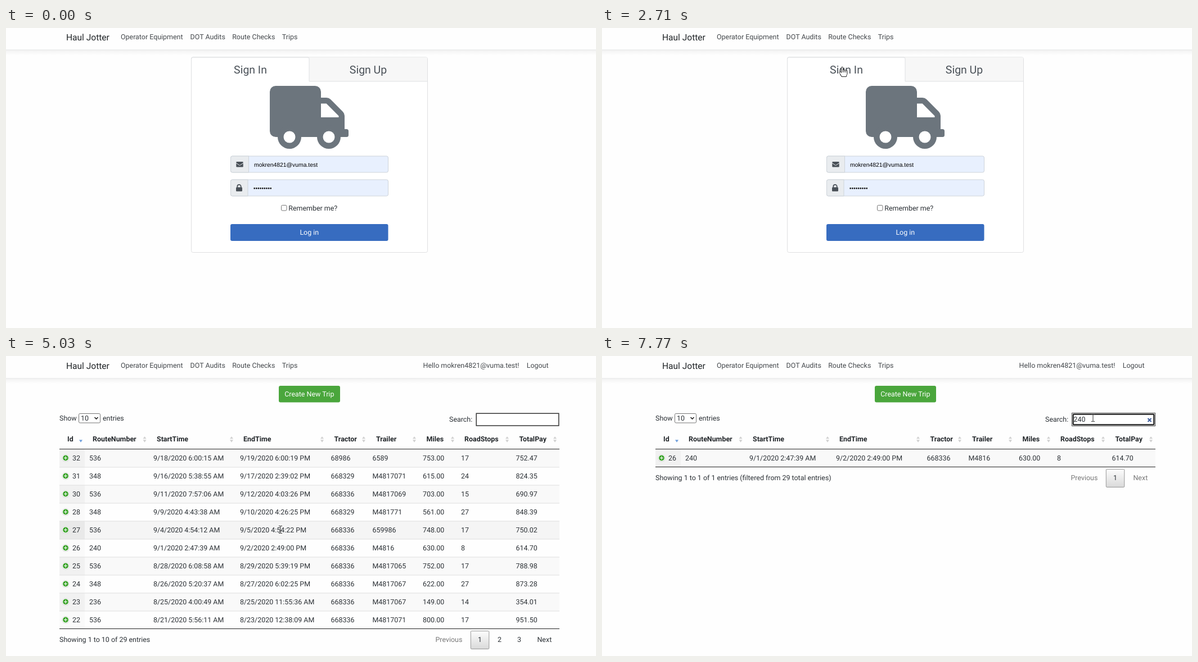
These frames come from a looping animation (1049x534 px, 8 s). An HTML page:

```html
<!DOCTYPE html>
<html lang="en">
<head>
<meta charset="utf-8">
<title>Trip log</title>
<style>
html, body { margin: 0; width: 100%; height: 100%; overflow: hidden; background: #fefefe; }
svg { display: block; font: 12.44px Roboto, sans-serif; fill: #2b3035; text-rendering: geometricPrecision; }
text { white-space: pre; }
.brand { font-size: 15.55px; fill: #1f2326; }
.nav { fill: #44484c; }
.tab { font-size: 19.44px; fill: #495057; text-anchor: middle; }
.mid { text-anchor: middle; }
.end { text-anchor: end; }
.inv { fill: #fff; text-anchor: middle; }
.head { font-weight: 700; fill: #212529; }
.dim { fill: #777; }
.title { font-size: 18.66px; }
.preview { font: 10.37px "Liberation Sans", Arial, sans-serif; fill: #000; }
.typed { fill: #212529; }
.icon { fill: #495057; }
.line { fill: none; stroke: #dee0e2; }
.dots { fill: none; stroke: #111; stroke-linecap: round; }
.cursor path { fill: #fff; stroke: #222; stroke-linejoin: round; }
.cursor .beam { fill: none; stroke: #333; }
</style>
</head>
<body>
<svg id="stage" width="1049" height="534" viewBox="0 0 1049 534"></svg>
<script>
const LOOP = 8000;
const MAIL = 'mokren4821@vuma.test';
const BLUE = '#376cc0';

const text = (x, y, s, cls = '') => `<text x="${x}" y="${y}" class="${cls}">${s}</text>`;
const box = (x, y, w, h, fill, more = '') =>
  `<rect x="${x}" y="${y}" width="${w}" height="${h}" fill="${fill}" ${more}/>`;
const path = (d, more = '') => `<path d="${d}" ${more}/>`;
const during = (spans, body) => `<g data-on="${spans}">${body}</g>`;
const rounded = 'rx="3"';
const field = 'rx="3" stroke="#ced4da"';

function nav(dy) {
  const links = [[204, 'Operator Equipment'], [327.6, 'DOT Audits'], [402.2, 'Route Checks'], [490.8, 'Trips']];
  return box(0, 38.5 + dy, 1049, 1, '#e4e5e6') +
    box(0, 39.5 + dy, 1049, 9, 'url(#shade)') +
    text(107, 22 + dy, 'Haul Jotter', 'brand') +
    links.map(([x, s]) => text(x, 20.4 + dy, s, 'nav')).join('');
}

function bullets(x, y, pitch, size) {
  return path(`M${x} ${y}h${pitch * 8 + .1}`, `class="dots" stroke-width="${size}" stroke-dasharray="0 ${pitch}"`);
}

// Autofilled values: small while previewed, full size once accepted.
function filled(x, mailY, passX, passY, preview, typed) {
  return during(preview, text(x, mailY, MAIL, 'preview') + bullets(passX, passY + 1, 3.63, 2.7)) +
    during(typed, text(x, mailY, MAIL, 'typed') + bullets(passX, passY, 4.2, 2.9));
}

function tabs(active) {
  const x = active ? 329.5 : 539.5;
  const edge = active ? 'M329.5 95V55a3 3 0 0 1 3-3H536a3 3 0 0 1 3 3V95H749.5M539 95'
                      : 'M329.5 95H539V55a3 3 0 0 1 3-3H746.5a3 3 0 0 1 3 3V95';
  return box(active ? 539 : 330, 52.5, 210, 42.5, '#f7f7f7') + path(edge, 'class="line"') +
    text(434.5, 80.6, 'Sign In', 'tab') + text(644, 80.6, 'Sign Up', 'tab');
}

const card = bottom => box(329.5, 52, 420, bottom - 52, '#fff', 'rx="3" stroke="#dfe0e1"');

function truck() {
  const wheel = x => `<circle cx="${x}" cy="416" r="96"/><circle cx="${x}" cy="416" r="48" fill="#fff"/>`;
  return `<g transform="translate(469 103) scale(.21875)" fill="#6c757d">` +
    path('M48 0H368a48 48 0 0 1 48 48V96h44a48 48 0 0 1 34 14l100 100a48 48 0 0 1 14 34V352h16' +
      'a16 16 0 0 1 16 16v32a16 16 0 0 1-16 16H48a48 48 0 0 1-48-48V48a48 48 0 0 1 48-48z' +
      'M416 144V256H560V244L460 144z', 'fill-rule="evenodd"') + wheel(160) + wheel(480) + '</g>';
}

function signIn() {
  const group = (y, split) => box(399.5, y, 280, 29, '#e8f0fe', field) +
    path(`M${split} ${y}H402.5a3 3 0 0 0-3 3v23a3 3 0 0 0 3 3H${split}z`, 'fill="#e9ecef" stroke="#ced4da"');
  const envelope = box(409.3, 238, 12.4, 9.4, '#495057', 'rx="1.2"') +
    path('M409 240.2l5.4 3.8q1.1.7 2.2 0l5.4-3.8', 'fill="none" stroke="#e9ecef"');
  const lock = box(409, 283.6, 11, 7.2, '#495057', 'rx="1.2"') +
    path('M411.3 284v-2a3.2 3.2 0 0 1 6.4 0v2', 'fill="none" stroke="#495057" stroke-width="1.7"');
  return card(399.5) + tabs(true) +
    during('1240-1620', path('M539 95V55a3 3 0 0 1 3-3H749', 'fill="none" stroke="#d3d6d9"')) +
    truck() + group(228, 431.5) + group(270, 430) + envelope + lock +
    filled(441, 247, 441.7, 284.4, '0-540 2710-2940', '540-1620 2940-4100') +
    box(489.5, 315.5, 9.5, 9.5, '#fff', 'rx="2" stroke="#767676"') +
    text(502.3, 325, 'Remember me?') +
    box(399, 349, 280.5, 30, BLUE, rounded) +
    during('3640-4100', box(398, 348, 282.5, 32, '#2e67db', 'rx="4" stroke="#a3c2f5" stroke-width="2.4"')) +
    text(539.3, 368.2, 'Log in', 'inv');
}

function signUp() {
  const input = y => box(357.7, y, 363, 29.5, '#e8f0fe', field);
  return card(361.5) + tabs(false) +
    text(357.5, 128.5, 'Create a new account.', 'title') +
    path('M357.5 152.5h363', 'class="line"') +
    text(357.5, 196, 'Email') + input(207) +
    text(357.5, 263, 'Password') + input(274) +
    filled(367, 226, 368.4, 289, '1620-2320', '2320-2710') +
    box(357.5, 316.4, 67, 29.6, BLUE, rounded) + text(391, 335.6, 'Register', 'inv');
}

const trips = `32|536|9/18 6:00:15 AM|9/19 6:00:19 PM|68986|6589|753.00|17|752.47
31|348|9/16 5:38:55 AM|9/17 2:39:02 PM|668329|M4817071|615.00|24|824.35
30|536|9/11 7:57:06 AM|9/12 4:03:26 PM|668336|M4817069|703.00|15|690.97
28|348|9/9 4:43:38 AM|9/10 4:26:25 PM|668329|M481771|561.00|27|848.39
27|536|9/4 4:54:12 AM|9/5 4:54:22 PM|668336|659986|748.00|17|750.02
26|240|9/1 2:47:39 AM|9/2 2:49:00 PM|668336|M4816|630.00|8|614.70
25|536|8/28 6:08:58 AM|8/29 5:39:19 PM|668336|M4817065|752.00|17|788.98
24|348|8/26 5:20:37 AM|8/27 6:02:25 PM|668336|M4817067|622.00|27|873.28
23|236|8/25 4:00:49 AM|8/25 11:55:36 AM|668336|M4817067|149.00|14|354.01
22|536|8/21 5:56:11 AM|8/23 12:38:09 AM|668336|M4817071|800.00|17|951.50
19|348|8/12 5:24:16 AM|8/13 3:12:40 PM|668336|M4817067|618.00|27|861.15
15|536|7/31 6:02:24 AM|8/1 5:40:08 PM|668329|M4817065|751.00|17|786.30
11|348|7/22 4:51:37 AM|7/23 2:36:24 PM|668336|M4817071|615.00|26|842.90`
  .split('\n').map(row => row.replace(/(\/\d+) /g, '$1/2020 ').split('|'));

const cols = [118, 148, 262, 416, 577.5, 651.5, 741, 809, 906.5];
const heads = [[109, 'Id', 133], [154, 'RouteNumber', 246.5], [268, 'StartTime', 401], [422, 'EndTime', 562],
  [583.5, 'Tractor', 636], [658, 'Trailer', 726], [747.5, 'Miles', 794], [815, 'RoadStops', 891], [912.5, 'TotalPay', 976]];

function tableRow(cells, i) {
  const y = 166 + 32 * i, odd = i % 2 === 0;
  return box(95, y, 889, 32, odd ? '#f9f9f9' : '#fefefe') +
    box(95, y, 45, 32, odd ? '#f1f1f1' : '#fafafa') +
    `<g data-row="${i}">${box(95, y, 889, 32, '#f5f5f5')}${box(95, y, 45, 32, '#e9e9e9')}</g>` +
    (i ? box(95, y - .5, 889, 1, '#dfdfdf') : '') +
    `<circle cx="106" cy="${y + 15.7}" r="6.6" fill="#bbb"/>` +
    `<circle cx="106" cy="${y + 15.5}" r="5.6" fill="#3ca32c" stroke="#fff" stroke-width="1.3"/>` +
    path(`M103 ${y + 15.5}h6m-3-3v6`, 'stroke="#fff" stroke-width="1.2"') +
    cells.map((s, c) => text(cols[c], y + 19.6, s)).join('');
}

function table(rows, info, pages) {
  const end = 166 + 32 * rows.length, base = end + 22.7;
  const first = 912.5 - 35 * (pages - 1);
  let nums = '';
  for (let p = 0; p < pages; p++) nums += text(first + 35 * p, base, p + 1, 'mid');
  return rows.map(tableRow).join('') + box(95, end - 1, 889, 1, '#222') + text(95, base, info) +
    text(first - 79, base, 'Previous', 'dim') +
    box(first - 16.2, end + 3.5, 32.5, 32, 'url(#page)', 'rx="1.5" stroke="#979797"') + nums +
    text(944.5, base, 'Next', pages > 1 ? '' : 'dim');
}

function tripPage() {
  const up = (x, y) => path(`M${x - 3} ${y}h6l-3-4z`, 'fill="#d0d0d0"');
  const down = (x, y, c) => path(`M${x - 3} ${y}h6l-3 4.5z`, `fill="${c}"`);
  const header = heads.map(([x, s, sx], i) => text(x, 152.3, s, 'head') +
    (i ? up(sx, 147.3) + down(sx, 149.3, '#d0d0d0') : down(sx, 149.3, '#6f9fdc'))).join('');
  const caret = (span, x) => during(span, box(x, 105.5, 1, 15, '#111'));
  const found = rows => `Showing 1 to ${rows.length} of ${rows.length} entries (filtered from 29 total entries)`;
  const match = q => trips.filter(row => row.some(s => s.includes(q)));
  return nav(.9) + text(912.5, 21, `Hello ${MAIL}!`, 'nav end') + text(925.7, 21, 'Logout', 'nav') +
    box(485, 53, 109, 29.5, '#4aa63c', rounded) + text(539.3, 72.2, 'Create New Trip', 'inv') +
    text(95, 115, 'Show') + box(129.5, 102.5, 38, 16.5, '#fff', 'rx="2" stroke="#767676"') +
    text(133, 115.2, '10') + path('M157.5 109l3 3 3-3', 'fill="none" stroke="#222" stroke-width="1.6"') +
    text(172, 115, 'entries') + text(788, 117, 'Search:') +
    during('4100-5820', box(836.2, 102.2, 146.6, 21.8, '#fff', 'stroke="#333" stroke-width="1.5"')) +
    during('5820-8000', box(835.5, 101.5, 148, 23, '#fff', 'stroke="#444"') +
      box(837.7, 103.7, 143.6, 18.6, '#fff', 'rx="1" stroke="#111" stroke-width="2"')) +
    during('6670-6900', text(838.6, 117, '2')) + during('6900-7220', text(838.6, 117, '24')) +
    during('7220-8000', text(838.6, 117, '240')) +
    during('6670-8000', path('M970.5 111l6 6m0-6l-6 6', 'stroke="#43619f" stroke-width="2.2"')) +
    caret('5820-6200', 838.5) + caret('6670-6900', 845.5) + caret('6900-7220', 852.5) + caret('7220-7770', 859.7) +
    header +
    during('4100-6900', table(trips.slice(0, 10), 'Showing 1 to 10 of 29 entries', 3)) +
    during('6900-7220', table(match('24'), found(match('24')), 1)) +
    during('7220-8000', table(match('240'), found(match('240')), 1)) +
    box(95, 165.2, 889, 1, '#222');
}

const cursors = {
  arrow: path('M.5.5V16l3.7-3.5 2.6 5.7 2.5-1.1-2.5-5.5h5z'),
  hand: path('M-1.4 10V1.7a1.4 1.4 0 0 1 2.8 0V6.5a1.3 1.3 0 0 1 2.6.3a1.3 1.3 0 0 1 2.6.4a1.2 1.2 0 0 1 2.4.6V12' +
    'c0 2-1.6 3-1.6 5.6H-1.2C-1.5 15-4.8 12-5 10c0-1.6 1.8-1.8 3.6.6z') + path('M1.4 6.5V10M4 7V10M6.6 7.5V10'),
  beam: path('M-3-6.5h2.3L0-6l.7-.5H3M0-6V6M-3 6.5h2.3L0 6l.7.5H3', 'class="beam"')
};

const fade = (id, a, b) => `<linearGradient id="${id}" x2="0" y2="1">` +
  `<stop ${a}/><stop offset="1" ${b}/></linearGradient>`;

const stage = document.getElementById('stage');
stage.innerHTML = '<defs>' +
  fade('shade', 'stop-opacity=".045"', 'stop-opacity="0"') +
  fade('page', 'stop-color="#fdfdfd"', 'stop-color="#d9d9d9"') + '</defs>' +
  during('0-4100', nav(0)) + during('0-1620 2710-4100', signIn()) + during('1620-2710', signUp()) +
  during('4100-8000', tripPage()) +
  '<g class="cursor">' + Object.keys(cursors).map(k => `<g id="${k}">${cursors[k]}</g>`).join('') + '</g>';

// Pointer moves: first step, last step, number of steps, x, y.
const moves = [
  [210, 210, 1, 1007, 517], [290, 290, 1, 706, 213], [540, 1310, 11, 641, 73], [1390, 1390, 1, 646, 83],
  [1940, 2170, 4, 469, 78], [2320, 2320, 1, 448, 68], [2400, 2400, 1, 434, 60], [2480, 2480, 1, 427, 69],
  [2940, 3640, 10, 543, 361], [4410, 4410, 1, 543, 366], [4730, 5030, 5, 488, 309],
  [5110, 5490, 6, 862, 133], [5570, 5820, 4, 873, 110]
];

function pointer(t) {
  let x = 1060, y = 545;
  for (const [from, to, n, nx, ny] of moves) {
    if (t < from) break;
    const step = t >= to ? n : 1 + Math.floor((t - from) / (to - from) * (n - 1));
    x += (nx - x) * step / n;
    y += (ny - y) * step / n;
  }
  return [x, y];
}

function shape(t, x, y) {
  const within = (l, top, r, b) => x > l && x < r && y >= top && y < b;
  if (t < 4100) {
    if (within(329, 52, 750, 95) || within(399, 349, 680, 379)) return 'hand';
    return within(431, 228, 680, 257) || within(431, 270, 680, 299) ? 'beam' : 'arrow';
  }
  if (t < 4410 || within(95, 130, 984, 166)) return 'hand';
  return within(95, 166, 984, 486) || within(836, 102, 984, 124) ? 'beam' : 'arrow';
}

const timed = [...stage.querySelectorAll('[data-on]')].map(el =>
  [el, el.dataset.on.split(' ').map(s => s.split('-').map(Number))]);
const hovers = [...stage.querySelectorAll('[data-row]')];
const show = (el, on) => { el.style.display = on ? '' : 'none'; };

function draw(t) {
  for (const [el, spans] of timed) show(el, spans.some(([a, b]) => t >= a && t < b));
  const [x, y] = pointer(t);
  const kind = shape(t, x, y);
  for (const k in cursors) {
    const el = document.getElementById(k);
    show(el, k === kind);
    el.setAttribute('transform', `translate(${x.toFixed(1)} ${y.toFixed(1)})`);
  }
  const row = t < 4410 ? -1 : Math.floor((y - 166) / 32);
  for (const el of hovers) show(el, +el.dataset.row === row);
}

const start = performance.now();
function tick() {
  draw((performance.now() - start) % LOOP);
  requestAnimationFrame(tick);
}
tick();
</script>
</body>
</html>
```
